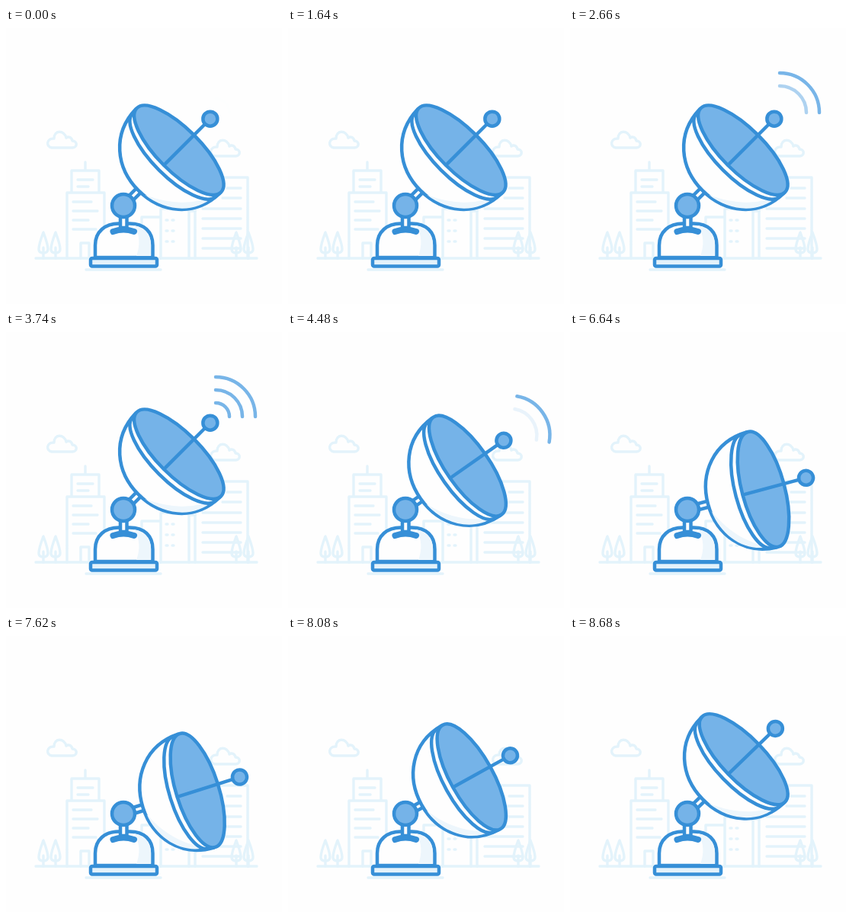
Recreate the animation shown at these times as an HTML page. Size 362 px wide and 362 px high, loop 8700 ms.

```html
<!DOCTYPE html>
<html lang="en">
<head>
<meta charset="utf-8">
<title>Satellite dish</title>
<style>
  html, body { margin: 0; width: 100%; height: 100%; overflow: hidden; background: #fefefe; }
  svg { display: block; width: 100vw; height: 100vh; }
  .city { fill: none; stroke: #e3f3fb; stroke-width: 3.4; stroke-linecap: round; stroke-linejoin: round; }
  .line { fill: #fefefe; stroke: #368fd7; stroke-width: 4.5; stroke-linecap: round; stroke-linejoin: round; }
  .line .blue { fill: #75b3e8; }
  .line .pale { fill: #e4f2fb; }
  .line .shade { fill: #edf6fc; stroke: none; }
  .line .open { fill: none; }
  .line .clamp { fill: none; stroke-width: 8; }
  .line .wave { fill: none; stroke: #78b5e8; }
</style>
</head>
<body>
<svg viewBox="0 0 362 362">
  <defs>
    <path id="tree" d="M0 302V288M0 268C-3 276-6 284-6 290Q-6 295 0 295Q6 295 6 290C6 284 3 276 0 268Z"/>
    <path id="cloud" d="M6 22H33C40 22 40 13 33 13C32 8 28 7 25 9C22-2 9-1 9 10C-1 9-2 21 6 22Z"/>
  </defs>

  <g class="city">
    <path d="M39 302H329M105 317H203"/>
    <use href="#cloud" x="54" y="135"/>
    <use href="#cloud" x="268" y="146"/>
    <use href="#tree" x="49"/>
    <use href="#tree" x="65"/>
    <use href="#tree" x="302"/>
    <use href="#tree" x="318"/>
    <path d="M80 302V216H129V302M86 216V187H122V216M104 187V176M98 302V282H109V302"/>
    <path d="M94 199H114M94 208H108M88 228H112M88 240H120M88 252H108M88 264H118"/>
    <path d="M178 302V248H203V302M203 248V237H240V302M240 302V240H248"/>
    <path d="M210 252H224M210 266H224M210 280H224" stroke-dasharray="2 6"/>
    <path d="M248 302V196H317V302M290 210H308M284 223H308M258 237H308M258 250H308M258 263H308M258 276H308M258 289H308"/>
  </g>

  <g class="line">
    <path d="M117 301V285C117 267 130 256.5 148 256.5H162C181 256.5 192.5 267 192.5 285V301Z"/>
    <path class="shade" d="M168 259C176 271 176 286 171 299H190V285C190 270 182 262 168 259Z"/>
    <rect class="pale" x="111" y="302" width="87" height="10.5" rx="2"/>
    <rect x="150" y="243" width="8.5" height="19"/>
    <path class="clamp" d="M140.500 267Q154 262 168 267"/>
    <g id="dish">
      <rect x="10" y="-4" width="24" height="8"/>
      <path d="M101-78C56-77 28-42 28 0S56 77 101 78Z"/>
      <path class="shade" d="M30 10C34 46 60 74 92 75C68 64 46 46 30 10Z"/>
      <ellipse cx="94" rx="28" ry="77"/>
      <ellipse class="blue" cx="103" rx="28" ry="78"/>
      <path class="open" d="M78 0H151"/>
      <circle class="blue" cx="161" r="9.5"/>
      <g id="waves" transform="rotate(45)"></g>
    </g>
    <circle class="blue" cx="154" cy="233" r="15"/>
  </g>
</svg>
<script>
  const LOOP = 8700, PULSE = 1650, PULSES = 3;
  const HIGH = -45, LOW = -15;
  const JOINT = { x: 154, y: 233 };
  const ANCHOR = 112; // distance along the dish axis of the point that moves in a straight line

  const dish = document.getElementById('dish');
  const waveGroup = document.getElementById('waves');

  const ramp = (t, from, to) => Math.min(1, Math.max(0, (t - from) / (to - from)));
  const mix = (a, b, k) => a + (b - a) * k;
  const cos = deg => Math.cos(deg * Math.PI / 180);
  const sin = deg => Math.sin(deg * Math.PI / 180);

  const waves = [
    { radius: 18, fadeIn: [0, 180], fadeOut: [700, 960] },
    { radius: 35, fadeIn: [120, 300], fadeOut: [850, 1240] },
    { radius: 52, fadeIn: [240, 420], fadeOut: [1240, 1640] }
  ].map(({ radius, fadeIn, fadeOut }) => {
    const arc = document.createElementNS('http://www.w3.org/2000/svg', 'path');
    arc.setAttribute('d', `M121 ${-122 - radius}a${radius} ${radius} 0 0 1 ${radius} ${radius}`);
    arc.setAttribute('class', 'wave');
    waveGroup.append(arc);
    return { arc, fadeIn, fadeOut };
  });

  function poseDish(k) {
    const angle = mix(HIGH, LOW, k);
    const x = JOINT.x + ANCHOR * mix(cos(HIGH), cos(LOW), k);
    const y = JOINT.y + ANCHOR * mix(sin(HIGH), sin(LOW), k);
    dish.setAttribute('transform', `translate(${x} ${y}) rotate(${angle}) translate(${-ANCHOR} 0)`);
  }

  function draw(t) {
    poseDish(ramp(t, 4080, 5290) - ramp(t, 7520, 8720));
    const phase = t % PULSE;
    for (const { arc, fadeIn, fadeOut } of waves) {
      const opacity = t < PULSE * PULSES ? ramp(phase, ...fadeIn) * (1 - ramp(phase, ...fadeOut)) : 0;
      arc.setAttribute('opacity', opacity);
    }
  }

  const start = performance.now();
  function tick() {
    draw((performance.now() - start) % LOOP);
    requestAnimationFrame(tick);
  }
  tick();
</script>
</body>
</html>
```
